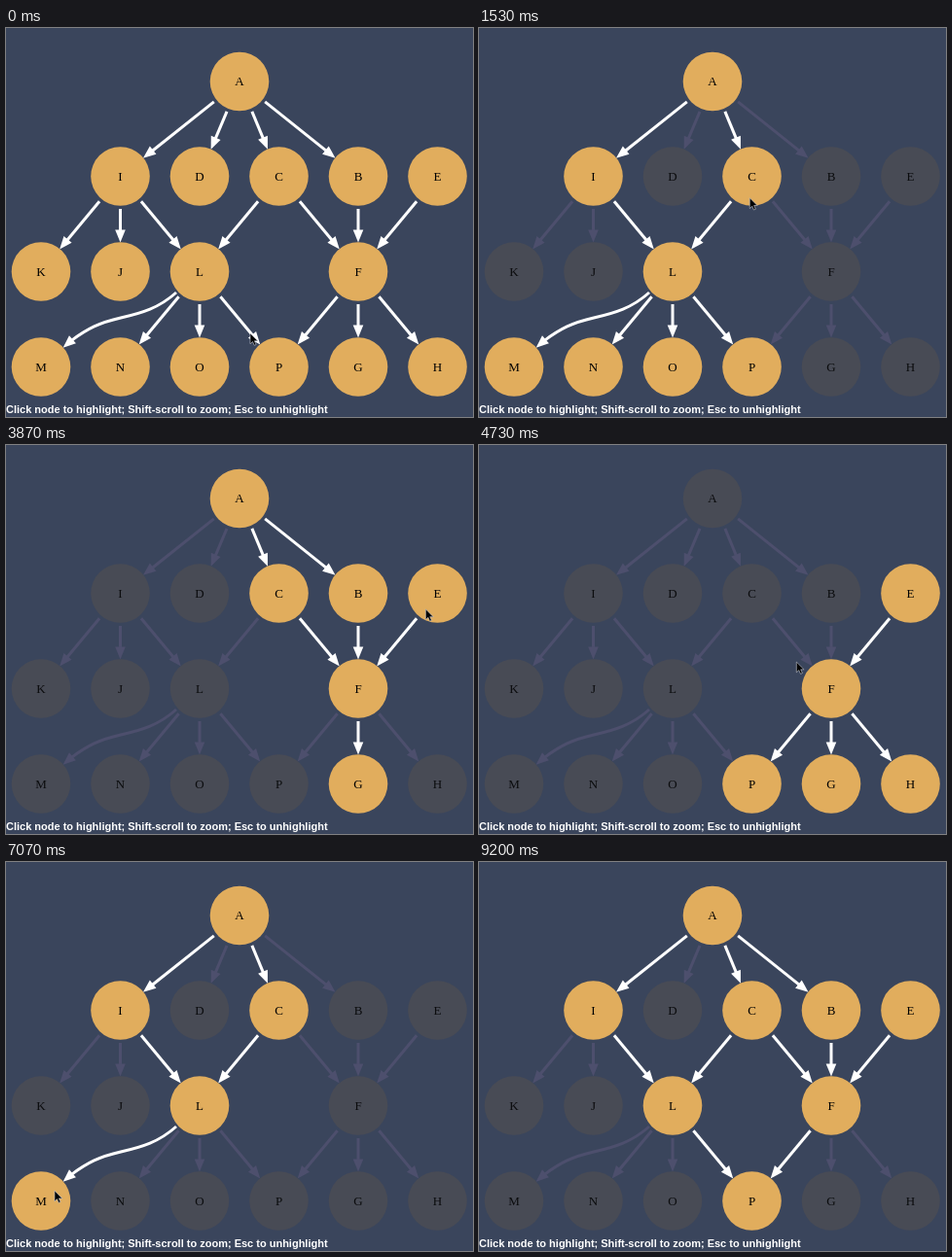
Animation of 480x400 px, one loop 9.34 s. Source, as an HTML page:

```html
<!DOCTYPE html>
<html lang="en">
<head>
<meta charset="utf-8">
<title>Graph highlighting</title>
<style>
  html, body { margin: 0; width: 100%; height: 100%; overflow: hidden; background: #3a455c; }
  svg { display: block; }
  .node circle { fill: #484b55; }
  .node text { font: 13px "Liberation Serif", serif; text-anchor: middle; fill: #0b0c0e; }
  .node.on circle { fill: #e1ad5d; }
  .node.on text { fill: #000; }
  .edge { fill: #4d4f6d; stroke: #4d4f6d; }
  .edge.on { fill: #fff; stroke: #fff; }
  .edge .line { fill: none; stroke-width: 3; }
  .edge .head { stroke: none; }
  .hint { font: bold 11px "Liberation Sans", sans-serif; fill: #fff; }
</style>
</head>
<body>
<svg id="stage" width="480" height="400" viewBox="0 0 480 400">
  <g id="edges"></g>
  <g id="nodes"></g>
  <text class="hint" x="0" y="396">Click node to highlight; Shift-scroll to zoom; Esc to unhighlight</text>
  <path id="cursor" d="M0 0V10.8L2.5 8.5L4.2 12.3L6.1 11.5L4.4 7.8H7.8Z"
        fill="#000" stroke="#c8ccd6" stroke-width=".6"/>
</svg>
<script>
const LOOP = 9340, RADIUS = 30, HEAD = 13;
const rows = [" IDCBE", "KJL F ", "MNOPGH"];
const links = "AI AD AC AB IK IJ IL CL CF BF EF LM LN LO LP FP FG FH".split(" ");

// Times at which a node is clicked
const clicks = [[730, "L"], [2070, "F"], [3070, "G"], [3970, "E"],
                [5130, "N"], [6670, "M"], [7560, "O"], [8470, "P"]];

// Pointer moves: start, end, target and an optional control point
const origin = [251, 314];
const moves = [
  { t: [70, 620], to: [206, 255] },
  { t: [1130, 1930], to: [350, 250], via: [278, 97] },
  { t: [2330, 2880], to: [371, 338] },
  { t: [3270, 3910], to: [432, 167] },
  { t: [4500, 5090], to: [121, 332] },
  { t: [6220, 6540], to: [49, 338] },
  { t: [7050, 7500], to: [200, 350] },
  { t: [7840, 8340], to: [262, 344] },
  { t: [8760, 9200], to: [243, 402] },
];

function add(parent, tag, attrs, text = "") {
  const el = document.createElementNS("http://www.w3.org/2000/svg", tag);
  for (const key in attrs) el.setAttribute(key, attrs[key]);
  el.textContent = text;
  return parent.appendChild(el);
}

const byId = id => document.getElementById(id);
const cursor = byId("cursor");

const places = { A: [240, 55] };
rows.forEach((row, r) => [...row].forEach((name, c) => {
  if (name !== " ") places[name] = [36 + 81.5 * c, 152.5 + 98 * r];
}));

const nodes = Object.entries(places).map(([name, [x, y]]) => {
  const el = add(byId("nodes"), "g", {});
  add(el, "circle", { cx: x, cy: y, r: RADIUS + 0.3 });
  add(el, "text", { x, y: y + 4.4 }, name);
  return { name, el };
});

const edges = links.map(link => {
  const [from, to] = link;
  const [x1, y1] = places[from], [x2, y2] = places[to];
  const curved = link === "LM";
  const angle = curved ? Math.atan2(20, -23) : Math.atan2(y2 - y1, x2 - x1);
  const ux = Math.cos(angle), uy = Math.sin(angle);
  const tip = [x2 - RADIUS * ux, y2 - RADIUS * uy];
  const base = [tip[0] - (HEAD - 2) * ux, tip[1] - (HEAD - 2) * uy];
  const d = curved
    ? `M175 272C157 288 140 293 118 298S84 309 ${base}`
    : `M${x1 + 33.5 * ux} ${y1 + 33.5 * uy}L${base}`;
  const el = add(byId("edges"), "g", {});
  add(el, "path", { class: "line", d });
  add(el, "path", {
    class: "head",
    d: `M0 0L${-HEAD} -5.3V5.3Z`,
    transform: `translate(${tip}) rotate(${angle * 180 / Math.PI})`,
  });
  return { from, to, el };
});

// Collects everything reachable along (or against) the arrows
function reach(name, start, end) {
  return edges.filter(e => e[start] === name)
    .flatMap(e => [e[end], ...reach(e[end], start, end)]);
}

function related(name) {
  return new Set([name, ...reach(name, "from", "to"), ...reach(name, "to", "from")]);
}

function highlight(name) {
  const lit = name ? related(name) : new Set(Object.keys(places));
  for (const n of nodes) n.el.setAttribute("class", lit.has(n.name) ? "node on" : "node");
  for (const e of edges) {
    e.el.setAttribute("class", lit.has(e.from) && lit.has(e.to) ? "edge on" : "edge");
  }
}

function pointerAt(time) {
  let pos = origin;
  for (const { t: [start, end], to, via } of moves) {
    if (time < start) break;
    const p = Math.min(1, (time - start) / (end - start));
    const u = p * p * (3 - 2 * p), v = 1 - u;
    pos = pos.map((a, i) => {
      const mid = via ? via[i] : (a + to[i]) / 2;
      return v * v * a + 2 * u * v * mid + u * u * to[i];
    });
  }
  return pos;
}

let selected;
function draw() {
  const time = performance.now() % LOOP;
  const click = clicks.filter(([t]) => t <= time).pop();
  const current = click ? click[1] : "";
  if (current !== selected) highlight(selected = current);
  cursor.setAttribute("transform", `translate(${pointerAt(time)})`);
  requestAnimationFrame(draw);
}
draw();
</script>
</body>
</html>
```
